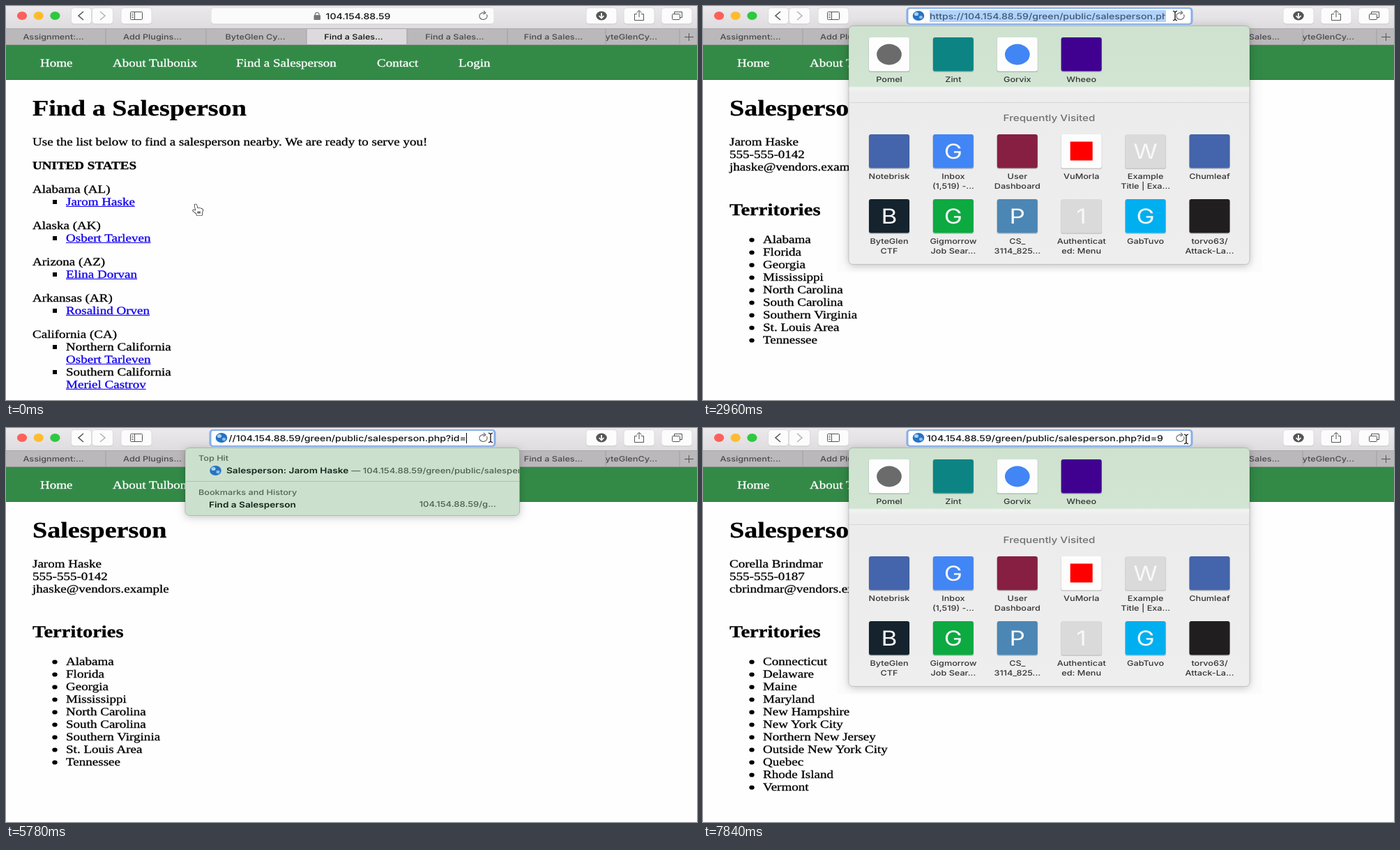
Write an HTML page with a canvas that moves like this. It is 991 by 565 pixels and loops after 7.99 s.

```html
<!DOCTYPE html>
<html lang="en">
<head>
<meta charset="utf-8">
<title>Find a Salesperson</title>
<style>
html, body { margin: 0; width: 100%; height: 100%; overflow: hidden; background: #fff; }
canvas { display: block; width: 991px; height: 565px; }
</style>
</head>
<body>
<canvas id="stage" width="991" height="565"></canvas>
<script>
const W = 991, H = 565, LOOP = 7990, STEP = 147.2;
const ASPECT = 1.19; // the whole screen is shown wider than tall
const SERIF = '"Liberation Serif", serif', SANS = 'Inter, sans-serif';
const UI = '500 10.65px ' + SANS, URL_FONT = '500 11.87px ' + SANS;
const HOST = '104.154.88.59', PATH = '/green/public/salesperson.php?id=';

const screen = document.getElementById('stage').getContext('2d');
const layer = document.createElement('canvas');
layer.width = W;
layer.height = H;
const layerCtx = layer.getContext('2d');
let g = screen;

// "heft" thickens the strokes a little, as the desktop's font smoothing does.
function text(str, x, y, font, color = '#000', align = 'left', heft = 0) {
  g.save();
  g.translate(x, y);
  g.scale(ASPECT, 1);
  g.textRendering = 'geometricPrecision';
  g.font = font;
  g.fillStyle = g.strokeStyle = color;
  g.textAlign = align;
  g.fillText(str, 0, 0);
  if (heft) {
    g.lineWidth = heft;
    g.strokeText(str, 0, 0);
  }
  const width = g.measureText(str).width * ASPECT;
  g.restore();
  return width;
}

function rect(x, y, w, h, color) {
  g.fillStyle = color;
  g.fillRect(x, y, w, h);
}

function box(x, y, w, h, r, fill, stroke) {
  g.beginPath();
  g.roundRect(x, y, w, h, r);
  if (fill) { g.fillStyle = fill; g.fill(); }
  if (stroke) { g.strokeStyle = stroke; g.lineWidth = 1; g.stroke(); }
}

function dot(x, y, r, color) {
  g.beginPath();
  g.ellipse(x, y, r * ASPECT, r, 0, 0, 7);
  g.fillStyle = color;
  g.fill();
}

function line(points, color, width = 1) {
  g.beginPath();
  points.forEach(([x, y]) => g.lineTo(x, y));
  g.strokeStyle = color;
  g.lineWidth = width;
  g.stroke();
}

function clipped(x, y, w, h, draw) {
  g.save();
  g.beginPath();
  g.rect(x, y, w, h);
  g.clip();
  draw();
  g.restore();
}

// ---------- browser frame ----------
function globe(x, y) {
  dot(x, y, 7, '#2573c4');
  dot(x - 3, y - 2.5, 2.6, '#a9d0ee');
  dot(x + 3.5, y + 2, 2.2, '#8fbfe6');
}

function button(x, w) {
  box(x, 3.5, w, 23, 4, '#cbc9cb');
  box(x, 2.5, w, 23, 4, '#fcfcfc', '#dcdadc');
}

function toolbar() {
  const shade = g.createLinearGradient(0, 0, 0, 32);
  shade.addColorStop(0, '#ebe9eb');
  shade.addColorStop(1, '#dedcde');
  rect(0, 0, W, 33, shade);
  ['#fc605b', '#fdbc2f', '#2fc840'].forEach((c, i) => dot(23 + i * 23.7, 14, 6, c));
  button(93.5, 29);
  button(123.5, 30);
  line([[111, 8], [104, 14], [111, 20]], '#555', 1.6);
  line([[135, 8], [142, 14], [135, 20]], '#b5b5b5', 1.6);
  button(165, 44);
  box(178.5, 8.5, 17, 11, 1, null, '#555');
  line([[184.5, 9], [184.5, 20]], '#555');
  [11.5, 14, 16.5].forEach(y => line([[180, y], [183, y]], '#777'));
  button(832, 44);
  dot(854, 14, 6.5, '#555');
  line([[854, 10], [854, 17]], '#fff', 1.8);
  line([[850.5, 14], [854, 17.5], [857.5, 14]], '#fff', 1.6);
  button(886, 44);
  line([[905, 11.5], [901.5, 11.5], [901.5, 20.5], [914.5, 20.5], [914.5, 11.5], [911, 11.5]], '#555');
  line([[908, 16], [908, 7]], '#555');
  line([[904.5, 9.5], [908, 6.5], [911.5, 9.5]], '#555');
  button(940, 44);
  box(955.5, 11.5, 11, 8, 1, null, '#555');
  line([[958.5, 11], [958.5, 8.5], [969.5, 8.5], [969.5, 16.5], [967, 16.5]], '#555');
}

const TAB_EDGES = [143, 287, 431, 575, 719, 860, 966];
function tabs(title) {
  rect(0, 32, W, 24, '#bab8ba');
  rect(0, 32, W, 1, '#a9a7a9');
  rect(431, 33, 144, 23, '#dcdadc');
  const names = ['Assignment:...', 'Add Plugins...', 'ByteGlen Cy...', title, 'Find a Sales...', 'Find a Sales...'];
  const centers = [68, 210, 357.5, 498.5, 643.5, 785];
  names.forEach((name, i) => text(name, centers[i], 48, UI, i === 3 ? '#111' : '#4b494b', 'center'));
  clipped(860, 33, 105, 22, () => text('ByteGlenCy...', 934, 48, UI, '#4b494b', 'right'));
  TAB_EDGES.forEach(x => rect(x - 0.5, 33, 1, 22, '#9f9d9f'));
  rect(0, 55, W, 1, '#a3a1a3');
  line([[973, 44.5], [986, 44.5]], '#555');
  line([[979.5, 39], [979.5, 50]], '#555');
}

function reloadIcon() {
  g.beginPath();
  g.ellipse(684.5, 14.5, 5.6, 4.9, 0, -0.5, 5.1);
  g.strokeStyle = '#666';
  g.lineWidth = 1.1;
  g.stroke();
  line([[685, 7], [688, 10], [684.5, 12]], '#666', 1.1);
}

function address(mode, id, caret) {
  if (mode === 'select' || mode === 'edit') {
    box(291.5, 2, 411, 25, 5, '#86aee9');
    box(294.5, 4, 405, 21, 3, '#fff');
  } else {
    box(294, 3.5, 405, 23, 4, '#cfcdcf');
    box(294, 2.5, 406, 23, 4, '#fbfbfb', '#e2e0e2');
  }

  if (mode === 'idle') {
    box(441.5, 13, 9.5, 7, 1, '#777');
    g.beginPath();
    g.ellipse(446.2, 13, 2.9, 3.6, 0, Math.PI, 0);
    g.strokeStyle = '#777';
    g.lineWidth = 1.3;
    g.stroke();
    text(HOST, 505, 19, URL_FONT, '#111', 'center');
  } else if (mode === 'fade') {
    g.beginPath();
    g.ellipse(308.5, 14, 6, 5, 0, 0, 7);
    g.strokeStyle = '#8d9bad';
    g.lineWidth = 1;
    g.stroke();
    line([[305.5, 14], [311.5, 14]], '#68798e', 1.2);
    line([[308.5, 11.5], [308.5, 16.5]], '#68798e', 1.2);
    rect(374, 6, 289, 17, '#cbdff7');
    clipped(374, 4, 289, 22, () => {
      let x = 374;
      x += text('https://', x, 19, URL_FONT, '#8897aa');
      x += text(HOST, x, 19, URL_FONT, '#3c4756');
      text(PATH + id, x, 19, URL_FONT, '#9aa9bb');
    });
  } else {
    globe(309, 14);
    const url = 'https://' + HOST + PATH + id;
    if (mode === 'select') {
      rect(325, 6, 339, 17, '#b1d3fb');
      clipped(325, 4, 338, 22, () => text(url, 325, 19, URL_FONT, '#405672'));
    } else {
      clipped(320, 4, 344, 22, () => text(url, 660, 19, URL_FONT, '#111', 'right'));
    }
    if (caret) rect(660, 7, 1, 15, '#000');
  }
  reloadIcon();
}

// ---------- web page ----------
const BODY = '16px ' + SERIF;

function copy(str, x, y, font = BODY, color = '#000') {
  return text(str, x, y, font, color, 'left', 0.3);
}

function nav() {
  rect(0, 56, W, 50, '#338a47');
  rect(0, 105, W, 1, '#2c7a3e');
  [['Home', 49], ['About Tulbonix', 153], ['Find a Salesperson', 330], ['Contact', 532], ['Login', 649]]
    .forEach(([label, x]) => copy(label, x, 87, BODY, '#fff'));
}

function heading(str, y, size) { copy(str, 38, y, `bold ${size}px ${SERIF}`); }

function link(label, y) {
  const w = copy(label, 86, y, BODY, '#1000ee');
  rect(86, y + 1, w, 1, '#1000ee');
}

function square(y) { rect(67, y - 7, 6, 6, '#000'); }

function listPage() {
  heading('Find a Salesperson', 157, 32);
  copy('Use the list below to find a salesperson nearby. We are ready to serve you!', 38, 200);
  heading('UNITED STATES', 234, 16);
  [['Alabama (AL)', 'Jarom Haske'], ['Alaska (AK)', 'Osbert Tarleven'],
    ['Arizona (AZ)', 'Elina Dorvan'], ['Arkansas (AR)', 'Rosalind Orven']]
    .forEach(([state, person], i) => {
      const y = 268 + i * 52;
      copy(state, 38, y);
      square(y + 17);
      link(person, y + 18);
    });
  copy('California (CA)', 38, 476);
  [['Northern California', 'Osbert Tarleven'], ['Southern California', 'Meriel Castrov']]
    .forEach(([area, person], i) => {
      const y = 494 + i * 36;
      square(y - 1);
      copy(area, 86, y);
      link(person, y + 18);
    });
}

const PEOPLE = {
  1: {
    lines: ['Jarom Haske', '555-555-0142', 'jhaske@vendors.example'],
    areas: ['Alabama', 'Florida', 'Georgia', 'Mississippi', 'North Carolina', 'South Carolina',
      'Southern Virginia', 'St. Louis Area', 'Tennessee']
  },
  9: {
    lines: ['Corella Brindmar', '555-555-0187', 'cbrindmar@vendors.example'],
    areas: ['Connecticut', 'Delaware', 'Maine', 'Maryland', 'New Hampshire', 'New York City',
      'Northern New Jersey', 'Outside New York City', 'Quebec', 'Rhode Island', 'Vermont']
  }
};

function personPage({ lines, areas }) {
  heading('Salesperson', 157, 32);
  lines.forEach((s, i) => copy(s, 38, 200 + i * 18));
  heading('Territories', 300, 24);
  areas.forEach((s, i) => {
    dot(70, 335.5 + i * 18, 3.1, '#000');
    copy(s, 86, 340 + i * 18);
  });
}

// ---------- drop-down panels ----------
function panel(x, y, w, h, fill) {
  g.save();
  g.shadowColor = 'rgba(0,0,0,.24)';
  g.shadowBlur = 12;
  g.shadowOffsetY = 2;
  box(x, y, w, h, 6, fill);
  g.restore();
  box(x, y, w, h, 6, fill, 'rgba(0,0,0,.16)');
}

// Each tile: label lines, colour, letter or inner shape.
const TILES = [
  [['Pomel'], '#fdfdfd', { dot: '#6b6b6b' }],
  [['Zint'], '#0c8484'],
  [['Gorvix'], '#fdfdfd', { dot: '#4285f4' }],
  [['Wheeo'], '#400090'],
  null, null,
  [['Notebrisk'], '#4464ab'],
  [['Inbox', '(1,519) -...'], '#4285f4', 'G'],
  [['User', 'Dashboard'], '#861f41'],
  [['VuMorla'], '#fdfdfd', { square: '#ff0000' }],
  [['Example', 'Title | Exa...'], '#dadada', 'W'],
  [['Chumleaf'], '#4464ab'],
  [['ByteGlen', 'CTF'], '#14232d', 'B'],
  [['Gigmorrow', 'Job Sear...'], '#0caa41', 'G'],
  [['CS_', '3114_825...'], '#4c86b4', 'P'],
  [['Authenticat', 'ed: Menu'], '#dadada', '1'],
  [['GabTuvo'], '#00aff0', 'G'],
  [['torvo63/', 'Attack-La...'], '#211e1f']
];

function favorites() {
  const fill = g.createLinearGradient(0, 28, 0, 370);
  const edge = 87 / 342;
  fill.addColorStop(0, '#cfe2d0');
  fill.addColorStop(edge, '#d2e5d3');
  fill.addColorStop(edge + 0.006, '#f1f3f1');
  fill.addColorStop(edge + 0.03, '#ececec');
  fill.addColorStop(1, '#eeeeee');
  rect(192, 32, 609, 349, 'rgba(0,0,0,.012)');
  panel(209, 28.5, 575, 342, fill);
  rect(210, 138, 574, 1, '#d5d8d5');
  text('Frequently Visited', 496.5, 165, '500 12.8px ' + SANS, '#707070', 'center');
  TILES.forEach((tile, i) => {
    if (!tile) return;
    const [label, color, mark] = tile;
    const x = 267 + (i % 6) * 91.9, y = [45, 184, 277][Math.floor(i / 6)];
    box(x - 29.5, y + 0.5, 59, 49.5, 3, 'rgba(0,0,0,.16)');
    box(x - 29, y, 58, 48.5, 3, color);
    if (typeof mark === 'string') text(mark, x, y + 35, '29.5px ' + SANS, '#f8f8f8', 'center');
    else if (mark && mark.dot) dot(x, y + 24.5, 15, mark.dot);
    else if (mark) rect(x - 16, y + 10.5, 32, 27, mark.square);
    label.forEach((s, n) => text(s, x, y + 64 + n * 14, UI, '#333', 'center'));
  });
}

function showFavorites(alpha) {
  g = layerCtx;
  g.clearRect(0, 0, W, H);
  favorites();
  g = screen;
  g.save();
  if (alpha < 0.5) {
    g.translate(496.5, 0);
    g.scale(0.988, 0.988);
    g.translate(-496.5, 0);
  }
  if (alpha < 1) rect(192, 32, 609, 349, 'rgba(0,0,0,' + 0.04 * alpha + ')');
  g.globalAlpha = alpha;
  g.drawImage(layer, 0, 0);
  g.restore();
}

function suggestions() {
  panel(257, 28.5, 479.5, 97, '#cce1cd');
  rect(258, 76, 478, 1, '#adc3ae');
  const bold = '600 11.45px ' + SANS, small = '500 10.95px ' + SANS;
  text('Top Hit', 276, 47, UI, '#4e6652');
  globe(300.5, 61);
  clipped(257, 50, 479, 24, () => {
    const x = 316 + text('Salesperson: Jarom Haske', 316, 65, bold, '#15251a');
    text('— ' + HOST + PATH, x + 4, 65, small, '#4a614e');
  });
  text('Bookmarks and History', 276, 95.5, UI, '#4e6652');
  text('Find a Salesperson', 291, 114, bold, '#15251a');
  text(HOST + '/g...', 703, 113, small, '#4a614e', 'right');
}

// ---------- pointer ----------
const PATH_KEYS = [
  [0, 268, 284], [500, 268, 284], [800, 150, 277], [1100, 150, 277], [1630, 618, 14], [1780, 618, 12],
  [2070, 662, 12], [2220, 677, 14], [3110, 677, 14], [3850, 695, 14], [6400, 695, 14],
  [6810, 693, 15], [6960, 692, 15], [7110, 693, 16], [LOOP, 693, 16]
];

function pointerAt(t) {
  const i = PATH_KEYS.findIndex(k => k[0] > t);
  const [t0, x0, y0] = PATH_KEYS[i - 1], [t1, x1, y1] = PATH_KEYS[i];
  const p = (t - t0) / (t1 - t0);
  return [x0 + (x1 - x0) * p, y0 + (y1 - y0) * p];
}

const HAND = new Path2D('M2 1Q3.5 -.5 4.5 1L5.5 6Q7 5 8 6.2Q9.5 5.6 10.2 7Q12 6.5 12 9L11 13V16H4.5V14L0 9.5Q0 7.5 2 8.5L3.4 9.5Z');
const FINGERS = new Path2D('M6.3 10.5V13.5M8.3 10.5V13.5');
const ARROW = new Path2D('M0 0V15L3.4 11.8L5.5 17L8 16L5.8 11H10.5Z');

function pointer(kind, x, y) {
  if (kind === 'beam') {
    line([[x - 3, y - 7], [x, y - 5.5], [x + 3, y - 7]], '#111', 1.2);
    line([[x, y - 6], [x, y + 6]], '#111', 1.3);
    line([[x - 3, y + 7], [x, y + 5.5], [x + 3, y + 7]], '#111', 1.2);
    return;
  }
  const hand = kind === 'hand', shape = hand ? HAND : ARROW;
  g.save();
  g.translate(x, y);
  g.scale(ASPECT, 1);
  g.lineJoin = 'round';
  g.strokeStyle = hand ? '#000' : '#fff';
  g.lineWidth = hand ? 1.1 : 1.6;
  g.fillStyle = hand ? '#fff' : '#000';
  g.stroke(shape);
  g.fill(shape);
  if (hand) g.stroke(FINGERS);
  g.restore();
}

// ---------- timeline ----------
// Returns the value of the last entry whose time has passed.
function at(t, entries) {
  return entries.reduce((value, [start, next]) => t >= start ? next : value, entries[0][1]);
}

function draw(t) {
  const page = at(t, [[0, 0], [1188, 1], [6515, 9]]);
  const mode = at(t, [[0, 'idle'], [2070, 'fade'], [2220, 'select'], [3560, 'edit'], [6220, 'idle'],
    [6960, 'fade'], [7110, 'select'], [7700, 'edit']]);
  const id = at(t, [[0, '1'], [5780, ''], [5930, '9']]);
  const caret = mode === 'edit' && at(t, [[0, true], [5040, false], [5480, true], [7840, false]]);
  const favAlpha = at(t, [[0, 0], [2070, 0.28], [2220, 0.93], [2370, 1], [5780, 0],
    [6960, 0.28], [7110, 0.93], [7250, 1]]);
  const kind = at(t, [[0, 'hand'], [1188, 'arrow'], [2220, 'beam'], [6515, 'arrow'], [7110, 'beam']]);

  rect(0, 0, W, H, '#fefefe');
  toolbar();
  tabs(page ? 'Salesperson:...' : 'Find a Sales...');
  nav();
  if (page) personPage(PEOPLE[page]);
  else listPage();
  if (favAlpha) showFavorites(favAlpha);
  if (t >= 5780 && t < 6220) suggestions();
  address(mode, id, caret);

  const held = t < 600 ? 0 : Math.min(t, 600 + Math.floor((t - 600) / STEP + 0.02) * STEP);
  pointer(kind, ...pointerAt(held));
}

function frame(now) {
  draw(now % LOOP);
  requestAnimationFrame(frame);
}
requestAnimationFrame(frame);
</script>
</body>
</html>
```
